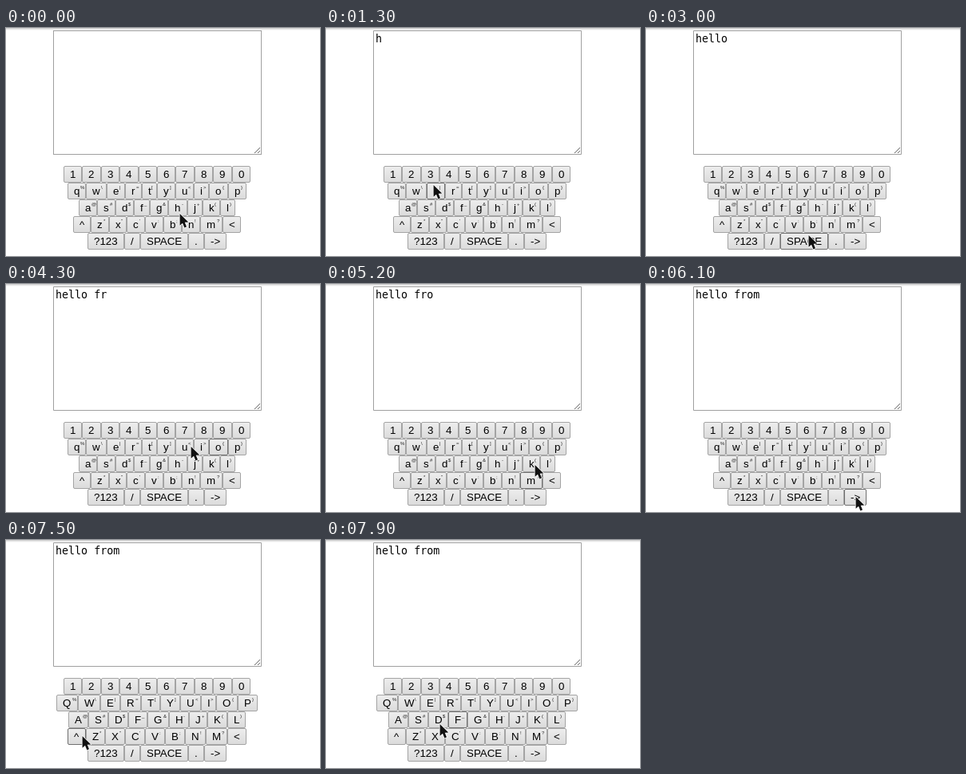
These frames come from a looping animation (393x286 px, 8 s). An HTML page with a canvas:

```html
<!DOCTYPE html>
<html lang="en">
<head>
<meta charset="utf-8">
<title>On-screen keyboard</title>
<style>
  html, body { margin: 0; width: 100%; height: 100%; overflow: hidden; background: #fff; }
  canvas { display: block; }
</style>
</head>
<body>
<canvas id="stage" width="393" height="286"></canvas>
<script>
const ctx = document.getElementById('stage').getContext('2d');
const LOOP = 8000, STEP = 100;
const KEY_FONT = '13.333px "Liberation Sans", Arial, sans-serif';
const HINT_FONT = '6px "Liberation Sans", Arial, sans-serif';
const TEXT_FONT = '13.333px "DejaVu Sans Mono", monospace';
const CENTER = 189, TOP = 173, KEY_H = 21, PAD = 8;

const rows = [
  { keys: [...'1234567890'], hints: '' },
  { keys: [...'qwertyuiop'], hints: '%\\|=[]<>{}' },
  { keys: [...'asdfghjkl'], hints: '@#$_&-+()' },
  { keys: [...'^zxcvbnm<'], hints: ' *"\':;!? ' },
  { keys: ['?123', '/', 'SPACE', '.', '->'], hints: '' }
];

// Keys the pointer visits; dx, dy shift its rest point from the key's middle
const start = [217, 233];
const visits = [
  { key: 'h', leave: 200, arrive: 400, press: 700 },
  { key: 'e', leave: 800, arrive: 1300, press: 1500, dx: -4, dy: -7 },
  { key: 'l', leave: 1500, arrive: 1600, press: 1900 },
  { key: 'l', leave: 1900, arrive: 2000, press: 2200 },
  { key: 'o', leave: 2300, arrive: 2500, press: 2600 },
  { key: 'SPACE', leave: 2600, arrive: 3200, press: 3400, dx: -3 },
  { key: 'f', leave: 3300, arrive: 3700, press: 3900 },
  { key: 'r', leave: 3800, arrive: 4000, press: 4200 },
  { key: 'o', leave: 4150, arrive: 4500, press: 4700 },
  { key: 'm', leave: 5030, arrive: 5530, press: 5600 },
  { key: '->', leave: 5700, arrive: 5900 },
  { key: '.', leave: 6500, arrive: 6600 },
  { key: '?123', leave: 6700, arrive: 6900, dx: -6, dy: -10 },
  { key: '^', leave: 7000, arrive: 7200, press: 7300 },
  { key: 'f', leave: 7680, arrive: 8200 }
];
const shiftAt = visits.find(v => v.key === '^').press;

function layout(t) {
  ctx.font = KEY_FONT;
  return rows.flatMap((row, r) => {
    const labels = row.keys.map(k => t >= shiftAt ? k.toUpperCase() : k);
    const widths = labels.map(s => ctx.measureText(s).width + 2 * PAD);
    let x = CENTER - widths.reduce((a, b) => a + b) / 2;
    return labels.map((label, i) => {
      const key = { id: row.keys[i], label, x, y: TOP + r * KEY_H, w: widths[i],
                    hint: (row.hints[i] || '').trim() };
      x += widths[i];
      return key;
    });
  });
}

function restPoint({ key, leave, dx = 0, dy = 0 }) {
  const k = layout(leave).find(k => k.id === key);
  return [k.x + k.w / 2 + dx, k.y + KEY_H / 2 - 1 + dy];
}

const easeOut = p => 1 - (1 - p) ** 2;

function pointerAt(t) {
  let pos = start;
  for (const v of visits) {
    if (t <= v.leave) break;
    const k = easeOut(Math.min(1, (t - v.leave) / (v.arrive - v.leave)));
    const goal = restPoint(v);
    pos = pos.map((p, i) => p + (goal[i] - p) * k);
  }
  return pos.map(Math.round);
}

// The highlight runs one step ahead of the drawn pointer
function isHot(key, t, [px, py]) {
  return t > visits[0].leave && px >= key.x && px < key.x + key.w &&
         py >= key.y && py < key.y + KEY_H;
}

function typedText(t) {
  return visits.filter(v => v.press <= t && v.key !== '^')
    .map(v => v.key === 'SPACE' ? ' ' : v.key).join('');
}

function line(x0, y0, x1, y1, color) {
  ctx.strokeStyle = color;
  ctx.lineWidth = 1;
  ctx.beginPath();
  ctx.moveTo(x0, y0);
  ctx.lineTo(x1, y1);
  ctx.stroke();
}

function drawPage(t) {
  ctx.fillStyle = '#fff';
  ctx.fillRect(0, 0, 393, 286);
  ['#d2d2d2', '#e6e6e6', '#f6f6f6'].forEach((c, y) => {
    ctx.fillStyle = c;
    ctx.fillRect(0, y, 393, 1);
  });
  ctx.fillStyle = '#fff';
  ctx.fillRect(59, 3, 261, 156);
  ctx.strokeStyle = '#a0a0a0';
  ctx.lineWidth = 1;
  ctx.strokeRect(59.5, 3.5, 260, 155);
  line(311, 157, 318, 150, '#666');
  line(315, 157, 318, 154, '#666');

  ctx.font = TEXT_FONT;
  ctx.fillStyle = '#000';
  ctx.fillText(typedText(t), 62, 18);
}

function drawKey({ x, y, w, label, hint }, hot) {
  const left = Math.round(x), right = Math.round(x + w);
  const fill = ctx.createLinearGradient(0, y, 0, y + KEY_H);
  fill.addColorStop(0, '#eeeeee');
  fill.addColorStop(1, '#dadada');
  ctx.beginPath();
  ctx.roundRect(left + 0.5, y + 0.5, right - left - 1, KEY_H - 1, 1.5);
  ctx.fillStyle = fill;
  ctx.fill();
  ctx.strokeStyle = hot ? '#707070' : '#a4a4a4';
  ctx.lineWidth = 1;
  ctx.stroke();

  ctx.fillStyle = '#000';
  ctx.font = KEY_FONT;
  ctx.fillText(label, Math.round(x + PAD), y + 15);
  ctx.fillStyle = '#222';
  ctx.font = HINT_FONT;
  ctx.fillText(hint, Math.round(x + w - PAD + 1), y + 8);
}

function drawPointer([x, y]) {
  const outline = [[0.6, 0], [0.6, 14.8], [4, 11.8], [6.4, 17.4], [9, 16.3],
                   [6.7, 10.8], [11.3, 10.5]];
  ctx.beginPath();
  outline.forEach(([dx, dy]) => ctx.lineTo(x + dx, y + dy));
  ctx.closePath();
  ctx.lineJoin = 'round';
  ctx.strokeStyle = 'rgba(255,255,255,0.9)';
  ctx.lineWidth = 1.6;
  ctx.stroke();
  ctx.fillStyle = '#111';
  ctx.fill();
}

function frame(now) {
  const t = Math.floor((now % LOOP) / STEP) * STEP;
  const next = pointerAt(t + STEP);
  drawPage(t);
  layout(t).forEach(key => drawKey(key, isHot(key, t, next)));
  drawPointer(pointerAt(t));
  requestAnimationFrame(frame);
}
requestAnimationFrame(frame);
</script>
</body>
</html>
```
